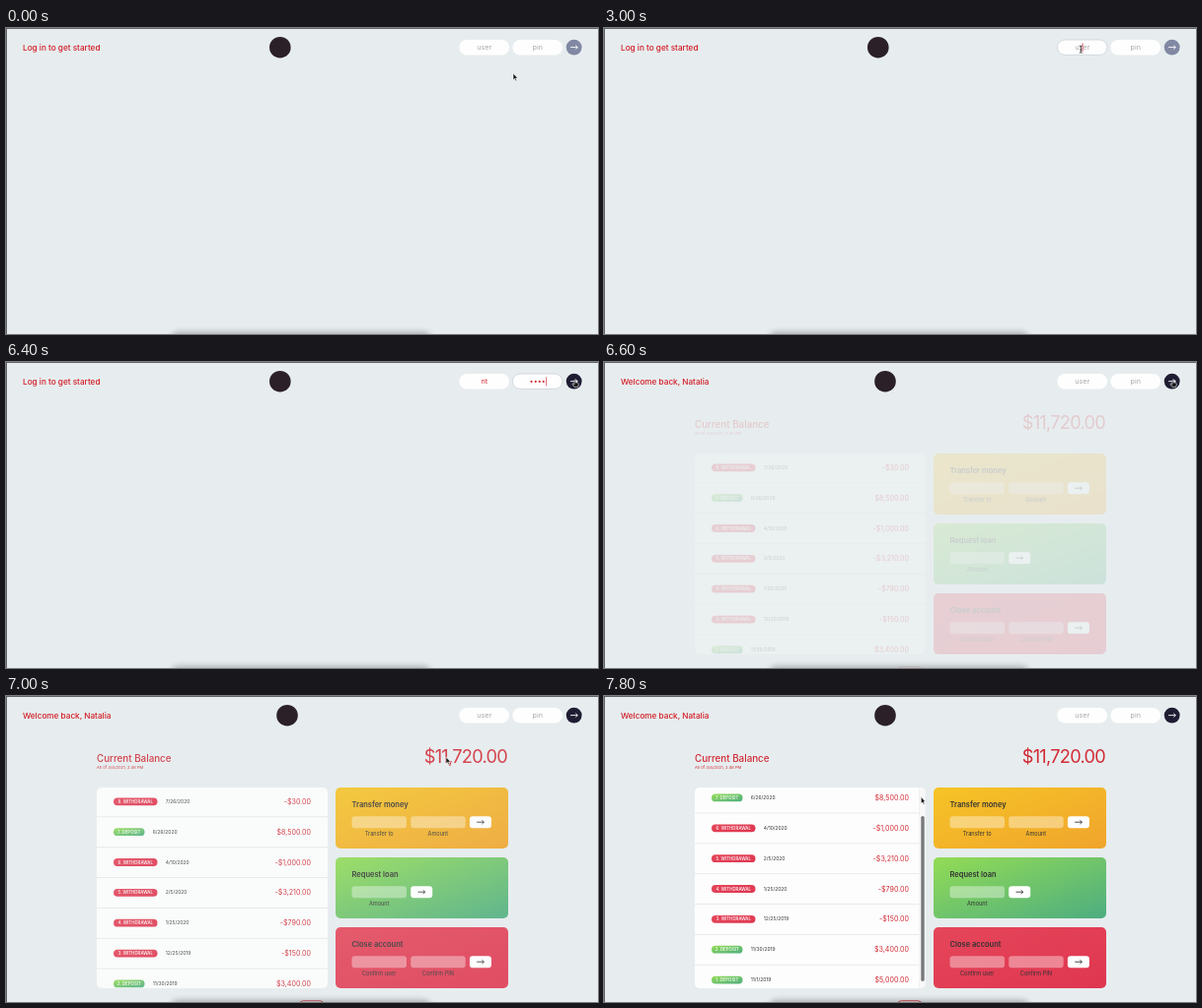
Write an HTML page that moves like this. It is 600 px wide and 311 px high and loops after 8000 ms.

```html
<!DOCTYPE html>
<html lang="en">
<head>
<meta charset="utf-8">
<title>Banking login</title>
<style>
  html, body { margin: 0; width: 100%; height: 100%; overflow: hidden; background: #e7edef; }
  svg { display: block; width: 100vw; height: 100vh; font-family: Inter, "Open Sans", sans-serif; }
</style>
</head>
<body>
<svg id="stage" viewBox="0 0 600 311" preserveAspectRatio="none">
  <defs>
    <linearGradient id="yellow" x2="1" y2="1"><stop stop-color="#f6c426"/><stop offset="1" stop-color="#f0a42d"/></linearGradient>
    <linearGradient id="green" x2="1" y2="1"><stop stop-color="#93dc55"/><stop offset="1" stop-color="#4dad80"/></linearGradient>
    <linearGradient id="red" x2="1" y2="1"><stop stop-color="#e5465a"/><stop offset="1" stop-color="#df3650"/></linearGradient>
    <clipPath id="listClip"><rect x="92" y="93" width="234" height="204" rx="5"/></clipPath>
    <filter id="blur" x="-10%" y="-100%" width="120%" height="300%"><feGaussianBlur stdDeviation="3"/></filter>
  </defs>
</svg>
<script>
const LOOP = 8000, STEP = 200, LOGIN = 6470;
const RED = '#d22a35', INK = '#333', DARK = '#1f1d33';
const stage = document.getElementById('stage');

function add(parent, tag, attrs, content) {
  const el = document.createElementNS('http://www.w3.org/2000/svg', tag);
  set(el, attrs);
  if (content !== undefined) el.textContent = content;
  parent.append(el);
  return el;
}
function set(el, attrs) {
  for (const key in attrs) el.setAttribute(key, attrs[key]);
}
const rect = (p, x, y, width, height, rx, fill, more) => add(p, 'rect', { x, y, width, height, rx, fill, ...more });
const text = (p, x, y, size, fill, content, more) => add(p, 'text', { x, y, 'font-size': size, fill, ...more }, content);
const centred = { 'text-anchor': 'middle' };
const toRight = { 'text-anchor': 'end' };
const arrow = (p, x, y, stroke) => add(p, 'path', {
  d: `M${x - 3.7} ${y}h7.2m-2 -1.9l2 1.9l-2 1.9`, fill: 'none', stroke, 'stroke-width': 0.9
});

// Account view
const app = add(stage, 'g', {});
text(app, 92, 66.5, 9.8, RED, 'Current Balance', { 'font-weight': 500 });
text(app, 92, 73.7, 4.1, RED, 'As of 3/4/2021, 2:46 PM');
text(app, 508, 68, 18.2, RED, '$11,720.00', { ...toRight, 'letter-spacing': '-.04em' });

const list = add(app, 'g', { 'clip-path': 'url(#listClip)' });
rect(list, 92, 93, 234, 204, 0, '#fdfdfd');
const rows = add(list, 'g', {});
const PITCH = 30.85;
[
  ['7/26/2020', '-$30.00'],
  ['6/26/2020', '$8,500.00'],
  ['4/10/2020', '-$1,000.00'],
  ['2/5/2020', '-$3,210.00'],
  ['1/25/2020', '-$790.00'],
  ['12/25/2019', '-$150.00'],
  ['11/30/2019', '$3,400.00'],
  ['11/1/2019', '$5,000.00']
].forEach(([date, amount], i) => {
  const y = 107.2 + i * PITCH;
  const out = amount[0] === '-';
  const width = out ? 44.5 : 31.5;
  rect(rows, 109, y - 3.8, width, 7.8, 3.9, out ? 'url(#red)' : 'url(#green)');
  text(rows, 109 + width / 2, y + 1.7, 4.4, '#fff', `${8 - i}. ${out ? 'WITHDRAWAL' : 'DEPOSIT'}`, { ...centred, 'font-weight': 500 });
  text(rows, 109 + width + 8.3, y + 1.7, 4.9, INK, date);
  text(rows, 309, y + 2.7, 7.1, RED, amount, toRight);
  rect(rows, 92, y + 15.2, 234, 0.9, 0, '#e6e8e9');
});
const scrollbar = add(list, 'g', {});
rect(scrollbar, 319.3, 93, 6.7, 204, 0, '#f8f8f8', { stroke: '#e8e8e8', 'stroke-width': 0.5 });
const thumb = rect(scrollbar, 321.3, 93, 3.4, 168, 1.7, '#77797b');

function card(y, fill, title, labels) {
  rect(app, 334, y, 175, 62, 5, `url(#${fill})`);
  text(app, 350.5, y + 20.2, 7.5, INK, title, { 'font-weight': 600 });
  labels.forEach((label, i) => {
    const x = 350.5 + i * 59.7;
    rect(app, x, y + 29.2, 55.5, 12, 3, '#fff', { 'fill-opacity': 0.38 });
    text(app, x + 27.7, y + 49.1, 5.6, INK, label, centred);
  });
  const x = 350.5 + labels.length * 59.7;
  rect(app, x, y + 29.2, 22, 12, 3, '#fff');
  arrow(app, x + 11, y + 35.2, INK);
}
card(93, 'yellow', 'Transfer money', ['Transfer to', 'Amount']);
card(164, 'green', 'Request loan', ['Amount']);
card(235, 'red', 'Close account', ['Confirm user', 'Confirm PIN']);
rect(app, 297.5, 309.7, 24.5, 12, 4, 'none', { stroke: RED, 'stroke-width': 0.8 });

const fade = app.animate([{ opacity: 0 }, { opacity: 1 }], { duration: 900, easing: 'ease', fill: 'both' });
fade.pause();

// Header
const greeting = text(stage, 17, 22.6, 8.2, '#d31c25', '', { 'font-weight': 500 });
const logo = add(stage, 'circle', { cy: 19.7, r: 10.8, fill: '#2b2027' });

function field(x, hint) {
  const mid = x + 25.3;
  const box = rect(stage, x, 12, 50.6, 15.4, 7.7, '#fefefe');
  const label = text(stage, mid, 22.2, 7.2, '#aaa', '', centred);
  const caret = rect(stage, mid, 15.3, 0.7, 9, 0, RED);
  return (value, focused, blink) => {
    label.textContent = value || hint;
    set(label, { fill: value ? RED : '#a9a9ab' });
    set(box, { stroke: focused ? '#c9d0d5' : 'none', 'stroke-width': 0.8 });
    const half = value ? label.getComputedTextLength() / 2 + 0.6 : 0;
    set(caret, { x: mid + half, opacity: focused && blink ? 1 : 0 });
  };
}
const userField = field(459.4, 'user');
const pinField = field(513.4, 'pin');
const button = add(stage, 'circle', { cx: 575.7, cy: 19.6, r: 7.9 });
arrow(stage, 575.8, 19.6, '#fff');

// Screen edges and the dock's shadow
rect(stage, 168, 309.5, 262, 20, 6, '#000', { opacity: 0.3, filter: 'url(#blur)' });
rect(stage, 0, 0, 600, 0.9, 0, '#53575a');
rect(stage, 0, 0, 0.9, 311, 0, '#53575a');

// Pointers, with the hot spot at 0,0
const outline = { fill: '#111', stroke: '#fff', 'stroke-width': 0.6 };
const pointers = {
  arrow: add(stage, 'path', { d: 'M0 0V6.7L1.5 5.4L2.5 7.7L3.6 7.2L2.6 5H4.6Z', ...outline }),
  beam: add(stage, 'path', { d: 'M-1.5 -3.7Q0 -3.7 0 -2.7V2.7Q0 3.7 -1.5 3.7M1.5 -3.7Q0 -3.7 0 -2.7M0 2.7Q0 3.7 1.5 3.7M-1 1h2', fill: 'none', stroke: '#333', 'stroke-width': 0.8 }),
  hand: add(stage, 'path', { d: 'M-.6 0Q0 -.7 .6 0V2.5L3 3Q3.8 3.3 3.6 4.5L3 7H-.7L-2.6 4.2Q-2.6 3.3 -1.7 3.6L-.6 4.4Z', ...outline })
};

const path = [
  [0, 'arrow', 514, 46], [400, 'arrow', 509, 41], [600, 'arrow', 496, 31],
  [800, 'beam', 485, 23], [1000, 'beam', 483.3, 21.7], [3400, 'none', 0, 0],
  [5800, 'arrow', 566, 9], [6000, 'hand', 576, 17.5], [6200, 'hand', 576.7, 18.3],
  [7000, 'arrow', 446, 62], [7200, 'arrow', 322.7, 102], [7400, 'arrow', 321.3, 102.6]
];
const userSteps = [[0, ''], [3400, 'n'], [3800, 'nt'], [6600, '']];
const pinSteps = [[0, 0], [5200, 1], [5400, 2], [5600, 3], [5800, 4], [6600, 0]];
const scrollSteps = [[0, 0], [7400, 3], [7600, 17], [7800, 34.7]];
const at = (steps, t) => steps.filter(s => s[0] <= t).pop();

function draw(t) {
  const loggedIn = t >= LOGIN;
  greeting.textContent = loggedIn ? 'Welcome back, Natalia' : 'Log in to get started';
  set(logo, { cx: loggedIn ? 285 : 277.8 });
  set(button, { fill: t >= 6000 ? DARK : '#8188a3' });

  const blink = t % 1200 < 800;
  userField(at(userSteps, t)[1], t >= 1000 && t < 5000, blink);
  pinField('•'.repeat(at(pinSteps, t)[1]), t >= 5000 && !loggedIn, blink);

  fade.currentTime = Math.max(0, t - LOGIN);
  const scroll = at(scrollSteps, t)[1];
  set(rows, { transform: `translate(0 ${-scroll})` });
  set(scrollbar, { opacity: scroll ? 1 : 0 });
  set(thumb, { y: 93 + scroll * 204 / 245 });

  const [, kind, x, y] = at(path, t);
  for (const name in pointers) {
    set(pointers[name], { transform: `translate(${x} ${y})`, opacity: name === kind ? 1 : 0 });
  }
}

const start = performance.now();
function tick() {
  const t = (performance.now() - start) % LOOP;
  draw(Math.floor(t / STEP) * STEP);
  requestAnimationFrame(tick);
}
tick();
</script>
</body>
</html>
```
